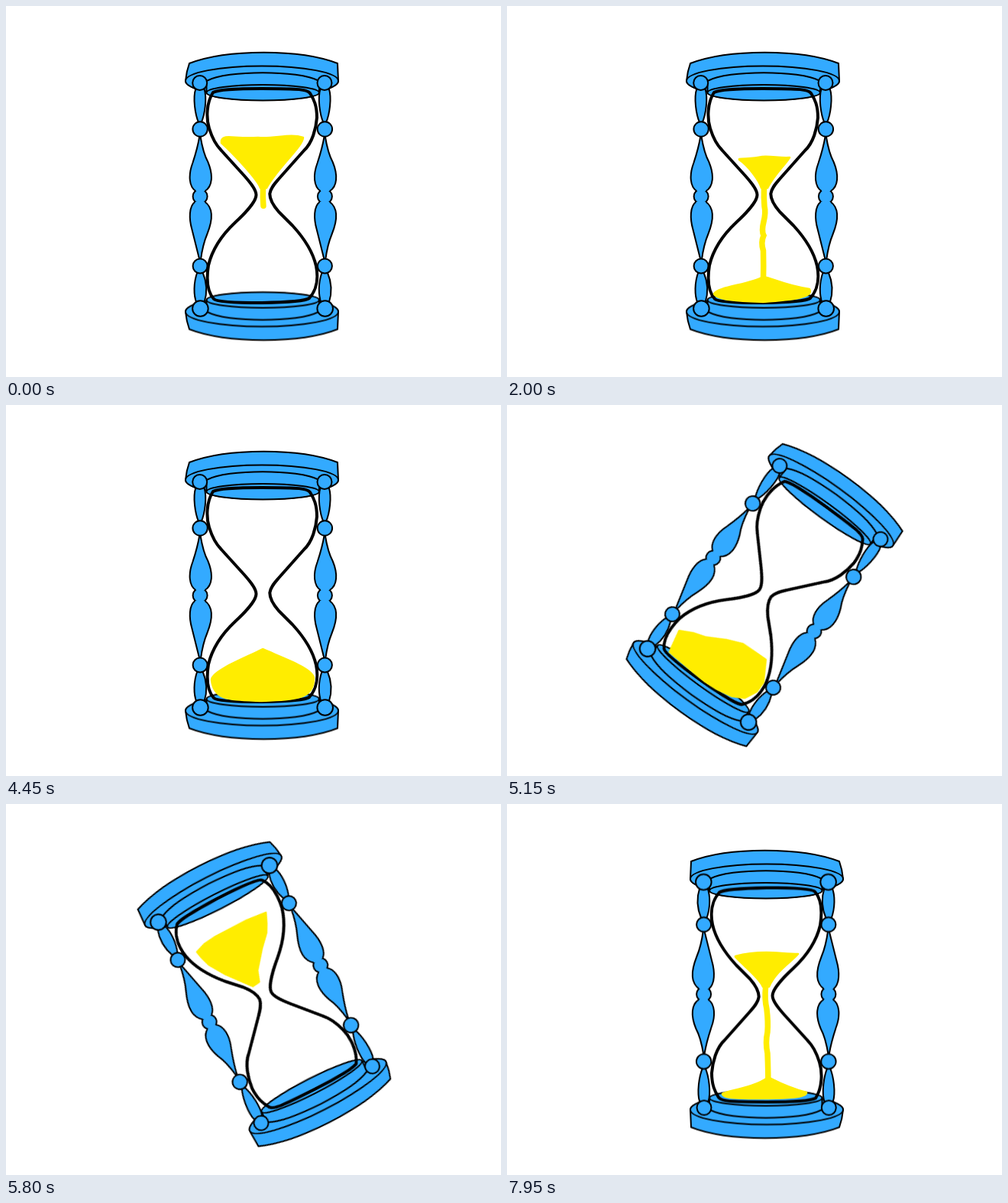
An HTML page without scripts for the animation above (8000 ms loop, 648 by 485 pixels).

```html
<!DOCTYPE html>
<html lang="en">
<head>
<meta charset="utf-8">
<title>Hourglass</title>
<style>
html, body { margin: 0; width: 100%; height: 100%; overflow: hidden; background: #fff; }
svg { display: block; width: 100vw; height: 100vh; }
.frame { fill: #33aaff; stroke: #000; stroke-width: 2; stroke-linejoin: round; }
.glass { fill: none; stroke: #000; stroke-width: 4; stroke-linejoin: round; }
.sand { fill: #ffed00; stroke: #ffed00; stroke-width: 2.5; stroke-linejoin: round; }
.stream { fill: none; stroke: #ffed00; stroke-width: 7.5; stroke-linecap: round; stroke-dasharray: 100 300; }

.turn, .sand, .stream, .first, .second, .tumble { animation: 8s linear infinite; }
.turn { transform-origin: 337.5px 248.8px; animation-name: turn; }
.first, .second, .tumble { animation-timing-function: step-end; }
.first { animation-name: show-first; }
.tumble { animation-name: show-tumble; }
.second { animation-name: show-second; }
.top1 { animation-name: top1; }
.top2 { animation-name: top2; }
.heap1 { animation-name: heap1; }
.heap2 { animation-name: heap2; }
.slide { animation-name: slide; }
.pour1 { animation-name: pour1; }
.pour2 { animation-name: pour2; }

/* half turn in twenty equal ticks */
@keyframes turn {
  0% { transform: rotate(0deg); }
  61.8125% { transform: rotate(0deg); animation-timing-function: steps(20); }
  74.3125%, 100% { transform: rotate(180deg); }
}
@keyframes show-first { 0% { opacity: 1; } 61.8125%, 100% { opacity: 0; } }
@keyframes show-tumble { 0% { opacity: 0; } 61.8125% { opacity: 1; } 74.3125%, 100% { opacity: 0; } }
@keyframes show-second { 0% { opacity: 0; } 74.3125%, 100% { opacity: 1; } }

/* sand draining from the upper bulb */
@keyframes top1 {
  0% { d: path("M282,176C285,167 298,174 330,172C352,174 372,166 389,172C389,183 355,212 341,238L333,238C330,228 298,193 282,179Z"); }
  25% { d: path("M304,200C312,199 322,200 334,197C346,196 358,199 370,198C364,208 350,220 341,238L333,238C330,228 316,209 304,201Z"); }
  41.875% { d: path("M323,225C327,223 331,224 335,221C340,221 344,223 348,223C346,228 342,232 341,238L333,238C332,233 328,230 323,226Z"); }
  48.75% { opacity: 1; d: path("M334,238C335,237 336,237 337,237C338,237 339,237 340,238C340,239 340,239 340,240L334,240C334,239 334,239 334,238Z"); }
  48.8%, 100% { opacity: 0; d: path("M334,238C335,237 336,237 337,237C338,237 339,237 340,238C340,239 340,239 340,240L334,240C334,239 334,239 334,238Z"); }
}
@keyframes top2 {
  0%, 74.375% { d: path("M284,176C300,173 320,172 341,172C355,172 375,173 393,174C388,186 356,214 343,239L335,239C330,228 302,194 284,177Z"); }
  80.625% { d: path("M286,181C305,182 312,177 345,177C352,181 366,178 393,180C385,190 354,215 342,240L334,240C331,229 306,202 286,182Z"); }
  99.375%, 100% { d: path("M299,199C310,196 322,194 340,194C352,194 368,196 381,196C374,205 352,218 343,239L335,239C331,228 310,212 299,200Z"); }
}

/* heap growing on the floor of the lower bulb */
@keyframes heap1 {
  0%, 5% { opacity: 0; d: path("M331,381C332,377 334,378 336,377C339,378 341,379 341,381C341,383 338,383 336,383C333,383 331,383 331,381Z"); }
  5.01% { opacity: 1; d: path("M331,381C332,377 334,378 336,377C339,378 341,379 341,381C341,383 338,383 336,383C333,383 331,383 331,381Z"); }
  25% { d: path("M271,376C276,367 318,364 335,354C346,355 362,365 396,370C402,381 375,384 335,387C310,386 274,385 271,376Z"); }
  41.875% { d: path("M269,362C272,354 316,339 335,333C344,332 375,350 402,361C403,382 385,385 335,387C300,385 272,386 269,362Z"); }
  53.75%, 100% { opacity: 1; d: path("M269,359C270,347 315,330 336,319C358,329 402,344 403,357C403,384 382,385 335,387C290,385 272,386 269,359Z"); }
}
@keyframes heap2 {
  0%, 80% { opacity: 0; d: path("M338,381C339,377 341,378 343,377C346,378 348,379 348,381C348,383 345,383 343,383C340,383 338,383 338,381Z"); }
  80.01%, 80.625% { opacity: 1; d: path("M338,381C339,377 341,378 343,377C346,378 348,379 348,381C348,383 345,383 343,383C340,383 338,383 338,381Z"); }
  99.375%, 100% { opacity: 1; d: path("M282,379C286,375 325,371 342,357C354,363 366,370 392,377C393,384 365,385 342,385C310,385 283,386 282,379Z"); }
}

/* heap sliding towards the neck while the glass turns */
@keyframes slide {
  0%, 61.875% { d: path("M269,360L285,344 310,331 336,319 362,331 390,344 403,358 401,372 392,382 365,386 336,387 312,387 290,385 274,378Z"); }
  64.375% { d: path("M274,352L290,344 306,339 330,326 352,317 388,316 403,342 403,357 395,373 380,381 358,385 340,386 320,385 280,382Z"); }
  68.75% { d: path("M296,385L300,367 298,355 317,335 340,304 343,282 358,278 393,317 402,343 398,361 391,374 377,383 355,387 318,388Z"); }
  74.375%, 100% { d: path("M282,322L288,312 298,301 311,287 326,269 332,258 339,258 360,285 375,302 383,311 390,320 376,323 362,324 312,324Z"); }
}

/* thread of sand: falls, runs, then its tail drops */
@keyframes pour1 {
  0% { stroke-dashoffset: 84; }
  5% { stroke-dashoffset: 0; }
  48.75% { stroke-dashoffset: 0; }
  55.625%, 100% { stroke-dashoffset: -100; }
}
@keyframes pour2 {
  0%, 74.375% { stroke-dashoffset: 100; }
  80%, 100% { stroke-dashoffset: 0; }
}
</style>
</head>
<body>
<svg viewBox="0 0 648 485" preserveAspectRatio="none">
  <defs>
    <g id="plate">
      <path d="M240,75C290,56 385,56 434,75L435,98C435,109 390,118 335,118S235,109 235,98Q236,86 240,75Z"/>
      <path d="M235,98C235,87 280,78.500 335,78.500S435,87 435,98C435,109 390,118 335,118S235,109 235,98Z"/>
      <path d="M262.500,98C290,83.500 382,83.500 410,98V113A73.750,10 0 0 1 262.500,113Z"/>
      <ellipse cx="336.200" cy="113.300" rx="73.700" ry="10.200"/>
    </g>
    <!-- open spindle ends merge with the middle bead -->
    <g id="post">
      <circle cx="253.700" cy="249" r="9.500"/>
      <path d="M248,242C239,236 238,221 244,205C247,196 251,182 253,170H254C256,182 259,195 264,204C271,221 270,236 260,242"/>
      <path d="M247,256C239,262 239,278 243,292C247,308 250,320 253,332H254.500C256,320 258,310 263,298C271,278 271,264 260,256"/>
      <path d="M248,108C244,120 247,142 252,153H255C260,142 263,120 259,108Z"/>
      <path d="M250,348C245,362 245,378 249,388H259C263,376 263,362 257,348Z"/>
      <circle cx="253.300" cy="100.500" r="9.500"/>
      <circle cx="253.700" cy="161" r="9.700"/>
      <circle cx="253.700" cy="340" r="9.500"/>
      <circle cx="254" cy="395.500" r="10.300"/>
    </g>
  </defs>

  <g class="turn">
    <g class="frame">
      <use href="#plate"/>
      <use href="#plate" transform="matrix(1 0 0 -1 0 497.6)"/>
      <use href="#post" x="0.400"/>
      <use href="#post" x="163.700"/>
    </g>
    <path class="glass" d="M271,113C262,127 262,147 266,160C270,173 275,182 282,189L312,222C320,231 327.500,240 327.500,247C327.500,256 311,273 300,283C284,298 270,318 265,339C262,358 264,374 272,383Q276,388 335,388Q390,387 397,382C407,371 409,355 406,340C401,318 387,300 375,287L357,269C350,261 345.300,252 345.300,245.500C346,238 352,232 358,225L390,189C401,179 406,160 407,146C407,130 403,122 398,114C394,109 385,108 335,108Q280,108 271,113Z"/>
    <g class="tumble"><path class="sand slide"/></g>
  </g>

  <g class="first">
    <path class="sand top1"/>
    <path class="stream pour1" pathLength="100" d="M336.500,238Q336,250 337,262Q339,270 336,282T336,300Q332,309 335.500,320Q336,340 335.500,360V381"/>
    <path class="sand heap1"/>
  </g>
  <g class="second">
    <path class="sand top2"/>
    <path class="stream pour2" pathLength="100" d="M338.500,240Q337,255 340,268Q342,285 341,298Q338,312 341,326Q342,350 342,380"/>
    <path class="sand heap2"/>
  </g>
</svg>
</body>
</html>
```
